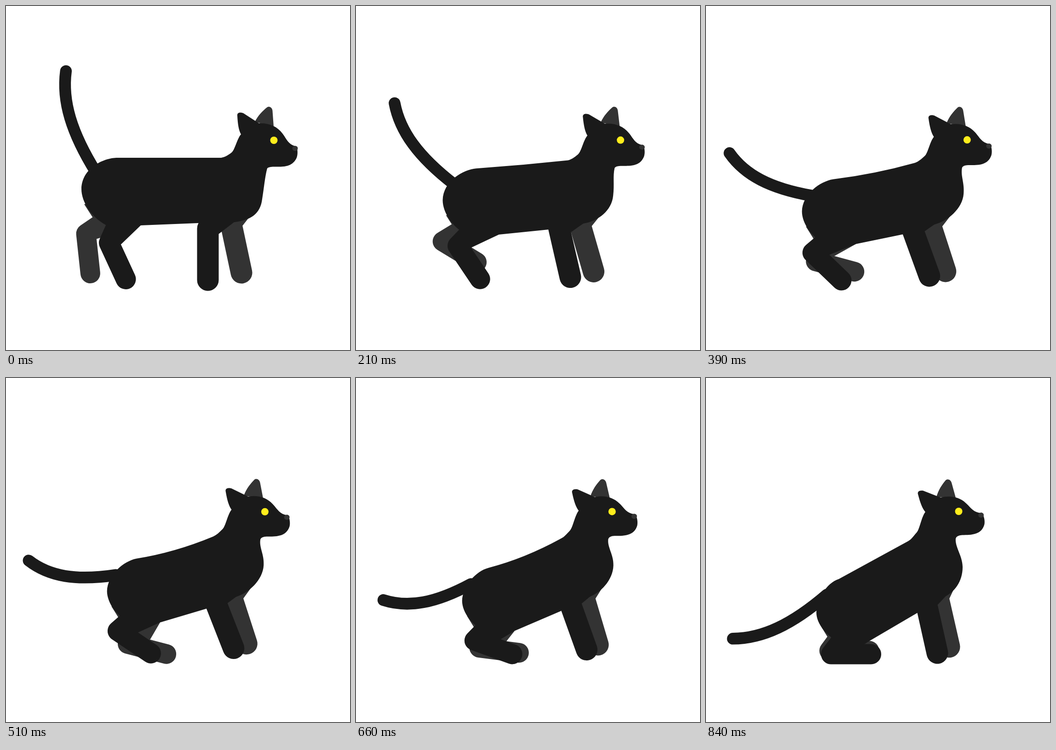
Recreate the animation shown at these times as an HTML page with a canvas. Size 748 by 748 pixels, loop 1080 ms.

```html
<!DOCTYPE html>
<html>
<head>
<meta charset="utf-8">
<title>Cat sitting down</title>
<style>
html, body { margin: 0; height: 100%; overflow: hidden; background: #fff; }
canvas { display: block; }
</style>
</head>
<body>
<canvas width="748" height="748"></canvas>
<script>
const g = document.querySelector('canvas').getContext('2d');
const BLACK = '#1a1a1a', GREY = '#333', YELLOW = '#ffed1c';
const STEPS = 27, LOOP = 1080, STEP_MS = 30, RAD = Math.PI / 180;

// Bezier curve through time: from the first value to the last, drawn to those between
const bezier = (k, ...v) => v.length === 1 ? v[0]
  : (1 - k) * bezier(k, ...v.slice(0, -1)) + k * bezier(k, ...v.slice(1));

function ease(k, from, to) {
  const u = Math.max(0, Math.min(1, (k - from) / (to - from)));
  return u * u * (3 - 2 * u);
}

const add = (p, x, y) => [p[0] + x, p[1] + y];
const move = p => g.moveTo(...p);
const line = p => g.lineTo(...p);
const curve = (a, b, c) => g.bezierCurveTo(...a, ...b, ...c);

function fill(color, draw) {
  g.beginPath();
  draw();
  g.fillStyle = color;
  g.fill();
}
function polygon(color, ...pts) {
  fill(color, () => pts.forEach(line));
}
function stroke(color, width, draw) {
  g.beginPath();
  draw();
  g.strokeStyle = color;
  g.lineWidth = width;
  g.stroke();
}
function limb(color, width, ...joints) {
  stroke(color, width, () => joints.forEach(line));
}

// k runs from 0 (standing) to 1 (sitting)
function pose(k) {
  const path = (...pts) => [0, 1].map(i => bezier(k, ...pts.map(p => p[i])));

  const back = path([240, 330], [294, 382], [289, 437]);
  const rump = path([164, 398], [224, 452], [240, 510]);
  const groin = path([293, 477], [335, 521], [355, 572]);
  const belly = path([418, 472], [422, 506], [459, 511]);
  const breast = path([497, 470], [487, 478], [518, 476]);
  const chest = path([557, 420], [563, 400], [558, 411]);

  // The head turns around the eye
  const eye = path([582.5, 292], [549.5, 290]);
  const turn = -11.3 * k * RAD, cos = Math.cos(turn), sin = Math.sin(turn);
  const h = (x, y) => {
    x -= 582.5; y -= 292;
    return add(eye, x * cos - y * sin, x * sin + y * cos);
  };

  // angle: direction of the shin, bend: how far along it the thigh joins
  function hindLeg(color, width, hip, knee, angle, bend) {
    const c = Math.cos(angle * RAD), s = Math.sin(angle * RAD), r = width / 2;
    limb(color, width, hip, knee, add(knee, 87 * c, 87 * s));
    polygon(color, knee, add(knee, r * s + bend * c, bend * s - r * c), groin, hip);
  }

  // A fixed arc that swings down around its root
  function tail() {
    const len = bezier(k, 230, 225, 146, 226);
    g.save();
    g.translate(...path([196, 362], [235, 420], [263, 471]));
    g.rotate(bezier(k, 73.4, 52.3, -13.4, -25.1) * RAD);
    stroke(BLACK, 25.5, () => {
      move([0, 0]);
      curve([-0.43 * len, 27], [-0.74 * len, 27], [-len, 0]);
    });
    g.restore();
  }

  function body() {
    const throat = path([568, 353], [543, 349]), jaw = path([580, 349.5], [557, 341.5]);
    const nape = h(468 - 6 * k, 330 + 4 * k), squash = 1 - 0.15 * k;
    const sag = 12 * Math.sin(Math.PI * k * k);
    move(nape);
    g.quadraticCurveTo((nape[0] + back[0]) / 2, (nape[1] + back[1]) / 2 + sag, ...back);
    curve(add(back, -28, 1 + 8 * k), add(rump, 1, -46 + 18 * k), rump);
    curve(add(rump, 0, 27 * squash), add(rump, 21, 64 * squash), add(rump, 61, 82 * squash));
    [groin, belly, breast].forEach(line);
    curve(add(breast, 36 - 14 * k, -5 - 5 * k), add(chest, 4 * k - 4, 32), chest);
    curve(add(chest, 4 - 4 * k, -24), add(throat, 3 * k - 5, 18), throat);
    g.quadraticCurveTo(throat[0] + 2, jaw[1] + 0.5, ...jaw);
    curve(add(jaw, 20, 0), h(622, 352), h(632, 330));
    curve(h(635, 322), h(634, 312), h(632, 306));
    line(h(624, 303));
    curve(h(612, 298), h(607, 284), h(601, 277));
    curve(h(590, 262), h(572, 254), h(550, 255));
    line(h(516, 233));
    curve(h(508, 230), h(502, 232), h(503, 239));
    curve(h(504, 257), h(506, 270), h(511, 279));
    curve(h(502 - 2 * k, 289), h(498 - 6 * k, 313), h(490 - 6 * k, 319));
    curve(h(482 - 6 * k, 325), h(476 - 6 * k, 328.5 + 3 * k), nape);
  }

  // Far side
  const lift = ease(k, 0.08, 0.66);
  hindLeg(GREY, 43, add(groin, -50, -29),
    [174 + 94 * lift, 495 + 68 * lift + 30 * k],
    86 - 71 * ease(k, -0.04, 0.34) - 15 * ease(k, 0.55, 1), bezier(k, 14, 35, 73));
  polygon(GREY, add(rump, 6 + 6 * k, 33), add(rump, 24 + 5 * k, 61), add(rump, 70, 70), add(rump, 60, 20));
  limb(GREY, 47, [533, 416],
    path([489, 472], [480, 475], [504.5, 477]), path([512, 580], [523, 572], [529, 584.5]));
  fill(GREY, () => {
    move(h(541, 252));
    curve(h(548, 238), h(558, 228), h(568, 220));
    curve(h(573, 217), h(579, 221), h(579.5, 228));
    line(h(582, 262));
  });

  // Near side
  tail();
  fill(BLACK, body);
  hindLeg(BLACK, 44, add(groin, -40, -27),
    path([224, 515], [206, 518], [257, 553], [272, 600.5]),
    bezier(k, 65.2, 48, 0), bezier(k, 14, 22, 73));
  limb(BLACK, 47, [512 + 16 * k, 428 + 5 * k],
    path([439, 484], [440, 477], [478, 486]), path([439, 596], [508, 577], [503, 598]));
  fill(GREY, () => g.ellipse(...h(628.5, 309.5), 6, 5.5, turn, 0, 7));
  fill(YELLOW, () => g.arc(...eye, 8, 0, 7));
}

function frame() {
  const step = Math.floor(performance.now() % LOOP / STEP_MS) - 1;
  g.clearRect(0, 0, 748, 748);
  pose(Math.max(0, Math.min(STEPS, step)) / STEPS);
  requestAnimationFrame(frame);
}
g.lineCap = g.lineJoin = 'round';
frame();
</script>
</body>
</html>
```
